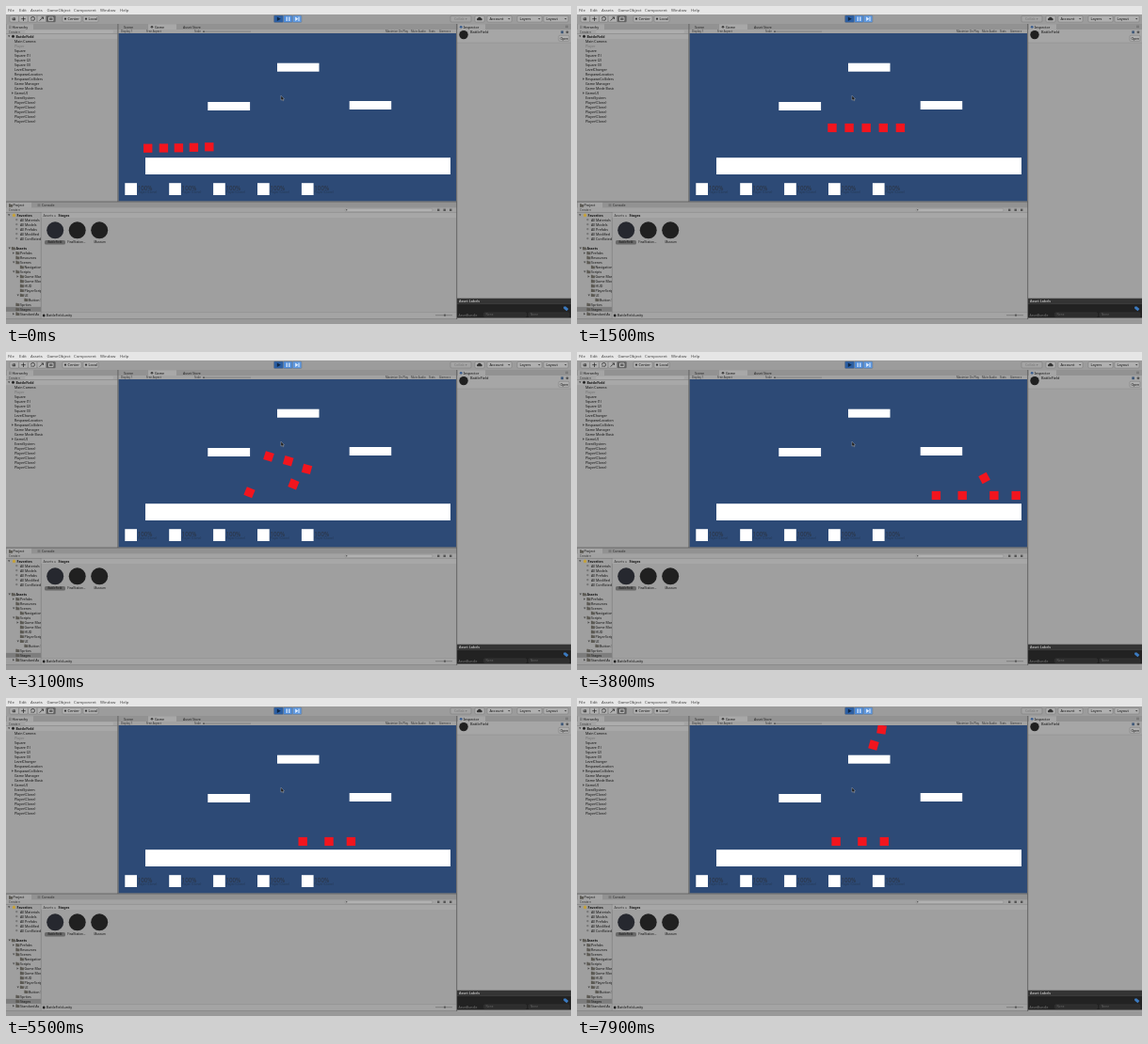
Write an HTML page that moves like this. It is 600 px wide and 338 px high and loops after 8 s.

```html
<!DOCTYPE html>
<html lang="en">
<head>
<meta charset="utf-8">
<title>Editor play mode</title>
<style>
  html, body { margin: 0; width: 100%; height: 100%; overflow: hidden; background: #a0a0a0; }
  svg { display: block; width: 100vw; height: 100vh; }
  text { font-family: "Noto Sans", "Open Sans", sans-serif; white-space: pre; }
</style>
</head>
<body>
<svg id="stage" viewBox="0 0 600 338" preserveAspectRatio="none"></svg>
<script>
const LOOP = 8000, STEP = 100, FLOOR_Y = 152.5;
const stage = document.getElementById('stage');
const parts = [];

const rect = (x, y, w, h, fill, extra = '') =>
  parts.push(`<rect x="${x}" y="${y}" width="${w}" height="${h}" fill="${fill}" ${extra}/>`);
const text = (x, y, str, size = 3.6, fill = '#111', weight = 400) =>
  parts.push(`<text x="${x}" y="${y}" font-size="${size}" fill="${fill}" font-weight="${weight}">${str}</text>`);
const path = (d, fill, extra = '') => parts.push(`<path d="${d}" fill="${fill}" ${extra}/>`);
const line = (d, color = '#222', width = .7) =>
  path(d, 'none', `stroke="${color}" stroke-width="${width}"`);
const disc = (x, y, r, fill) => parts.push(`<circle cx="${x}" cy="${y}" r="${r}" fill="${fill}"/>`);
const button = (x, y, w, h, fill = '#b0b0b0') =>
  rect(x, y, w, h, fill, 'rx="1" stroke="#6c6c6c" stroke-width=".4"');
const arrow = (x, y, open) => path(open
  ? `M${x} ${y - 1}h2.4l-1.2 2z` : `M${x} ${y - 1.2}v2.4l2-1.2z`, '#4c4c4c');
const folder = (x, y) => path(`M${x} ${y - 1.7}h1.5l.5.6h2v2.8h-4z`, '#5c5a54');

function drawMenuAndToolbar() {
  rect(0, 0, 600, 338, '#a0a0a0');
  rect(0, 0, 600, 9, '#e6e6e6');
  [[2, 'File'], [14, 'Edit'], [26, 'Assets'], [43.5, 'GameObject'], [72, 'Component'],
   [100, 'Window'], [121, 'Help']].forEach(([x, s]) => text(x, 6, s, 4.3, '#444'));

  rect(0, 9, 600, 10, '#9c9c9c');
  for (let i = 0; i < 5; i++) button(4 + i * 9.7, 10.3, 9.7, 6.8, i === 4 ? '#606060' : '#b0b0b0');
  line('M7 14.8V12.6M8.3 14.8V12M9.6 14.8V12.4M7 14.8h3');
  line('M18.5 11.5v4.5M16.2 13.7h4.6');
  line('M26.5 13.5a2 2 0 1 1 2 2M26.3 15h2');
  line('M35.5 15.5l4-3.5M37.5 12h2v2');
  line('M45.5 12h4.5v3.6h-4.5z', '#e0e0e0');
  button(60, 10.5, 20, 6.5); disc(63, 13.7, 1.1, '#333'); text(65.5, 15.1, 'Center', 3.9);
  button(82, 10.5, 16, 6.5); disc(85, 13.7, 1.1, '#333'); text(87.5, 15.1, 'Local', 3.9);

  button(284.5, 10, 10, 7.5, '#2c5fa3');
  button(294.5, 10, 9.7, 7.5, '#4f8cd9');
  button(304.2, 10, 9.7, 7.5, '#5f98de');
  path('M287.8 11.5v4.5l4-2.25z', '#0f2747');
  path('M297.6 11.5h1.2v4.5h-1.2zM300.2 11.5h1.2v4.5h-1.2zM307.2 11.5v4.5l3-2.25zM310.5 11.5h1v4.5h-1z', '#e3efff');

  button(472, 10.5, 22, 6.5, '#a4a4a4'); text(476, 15.1, 'Collab ▾', 3.7, '#777');
  button(498, 10.5, 10, 6.5);
  path('M500.5 15.2a1.2 1.2 0 0 1 .5-2.2a2 2 0 0 1 3.7 0a1.2 1.2 0 0 1 .5 2.2z', '#333');
  [[511, 'Account', 26], [543, 'Layers', 26], [571, 'Layout', 26]].forEach(([x, s, w]) => {
    button(x, 10.5, w, 6.5);
    text(x + 2.5, 15.1, s, 3.9);
    path(`M${x + w - 4} 13h2.4l-1.2 1.6z`, '#444');
  });
}

function drawHierarchy() {
  rect(0, 19, 118.5, 189, '#9f9f9f');
  rect(0, 19, 118.5, 6, '#929292');
  rect(1, 19.3, 28, 5.7, '#a5a5a5');
  line('M3 21.2h2.5M3 22.4h2.5M3 23.6h2.5', '#444', .4);
  text(6.5, 23.5, 'Hierarchy', 3.7);
  rect(0, 25, 118.5, 4.5, '#a4a4a4');
  line('M0 29.6H118.5', '#777', .4);
  text(3, 28.6, 'Create ▾', 3.1, '#333');
  rect(20, 25.7, 94, 3.2, '#adadad', 'rx="1.5"');
  rect(0, 30, 118.5, 5, '#a8a8a8');
  arrow(2, 32.3, true);
  disc(7.5, 32.3, 1.5, '#222');
  text(10.5, 33.6, 'BattleField', 3.5, '#111', 700);
  const rows = ['Main Camera', 'Player', 'Square', 'Square (1)', 'Square (2)', 'Square (3)',
    'LevelChanger', 'RespawnLocation', 'RespawnColliders', 'Game Manager', 'Game Mode Basic',
    'GameUI', 'EventSystem', ...Array(5).fill('Player(Clone)')];
  rows.forEach((s, i) => {
    const y = 38.6 + i * 5.02;
    text(9, y, s, 3.6, s === 'Player' ? '#707070' : '#111');
    if (i === 8 || i === 11) arrow(6, y - 1.3, false);
  });
}

function drawGamePanel() {
  rect(119, 19, 359.5, 10, '#929292');
  text(125, 23.5, 'Scene', 3.6, '#222');
  rect(151, 19.3, 30, 5.7, '#a8a8a8');
  disc(155, 22.2, 1.3, '#444');
  text(158, 23.5, 'Game', 3.6);
  text(188, 23.5, 'Asset Store', 3.6, '#222');
  rect(119, 25, 359.5, 4, '#a2a2a2');
  text(122, 28.3, 'Display 1', 2.9, '#333');
  text(149, 28.3, 'Free Aspect', 2.9, '#333');
  text(200, 28.3, 'Scale', 2.9, '#333');
  line('M209 27.2H260', '#666', .5);
  disc(210, 27.2, .9, '#555');
  text(403, 28.3, 'Maximize On Play', 2.9, '#333');
  text(430, 28.3, 'Mute Audio', 2.9, '#333');
  text(449, 28.3, 'Stats', 2.9, '#333');
  text(460, 28.3, 'Gizmos ▾', 2.9, '#333');
  rect(119.5, 29, 358.5, 178.5, '#2d4a76');
  [[288, 60.7, 44.5, 9], [214.3, 102, 44.8, 9], [364.7, 101, 44.5, 9], [148, 161.2, 324, 17.8]]
    .forEach(([x, y, w, h]) => rect(x, y, w, h, '#fff'));
  for (let i = 0; i < 5; i++) {
    const x = 126.3 + i * 46.9;
    rect(x, 188.2, 12.7, 12.8, '#fff');
    text(x + 13.4, 195.8, '100%', 6.2, '#2b3340');
    text(x + 13.4, 199.4, 'Player (Clone)', 3.2, '#263954');
  }
}

function drawProject() {
  rect(0, 208, 478.5, 130, '#9f9f9f');
  rect(0, 208, 478.5, 6.5, '#929292');
  rect(1, 208.7, 26, 6, '#a5a5a5');
  folder(3, 212); text(7.5, 213.2, 'Project', 3.6);
  rect(33.5, 210.3, 3, 2.8, '#777'); text(38, 213.2, 'Console', 3.6, '#222');
  rect(0, 214.5, 478.5, 4.8, '#a3a3a3');
  text(3, 218.2, 'Create ▾', 3.1, '#333');
  rect(360, 215.2, 93, 3.5, '#b1b1b1', 'rx="1.7" stroke="#777" stroke-width=".3"');
  disc(361.7, 216.8, .8, '#555');
  [458, 464.5, 471].forEach(x => rect(x, 215.6, 2.4, 2.4, '#555'));
  line('M0 219.4H478.5M37.3 219.4V333', '#6e6e6e', .5);
  rect(37.5, 219.6, 441, 5.4, '#a7a7a7');
  text(39.5, 223.8, 'Assets', 3.6, '#333');
  text(51.5, 223.8, '▸', 3.5, '#444');
  text(55.5, 223.8, 'Stages', 3.6, '#111', 700);

  arrow(2, 222.2, true);
  path('M8.5 220l.7 1.5 1.6.2-1.2 1.1.3 1.6-1.4-.8-1.4.8.3-1.6-1.2-1.1 1.6-.2z', '#caa22c');
  text(11.5, 223.6, 'Favorites', 3.5, '#111', 700);
  ['All Materials', 'All Models', 'All Prefabs', 'All Modified', 'All Conflicted'].forEach((s, i) => {
    const y = 228.6 + i * 5;
    disc(11.3, y - 1.5, 1.2, '#777');
    text(15, y, s, 3.6);
  });

  const tree = [[0, 'Assets'], [1, 'Prefabs'], [1, 'Resources'], [1, 'Scenes'], [2, 'Navigation'],
    [1, 'Scripts'], [2, 'Game Man'], [2, 'Game Mod'], [2, 'HUD'], [2, 'PlayerScrip'],
    [2, 'UI'], [3, 'Button S'], [1, 'Sprites'], [1, 'Stages'], [1, 'Standard As']];
  parts.push('<g clip-path="url(#treeClip)">');
  tree.forEach(([depth, s], i) => {
    const y = 258.9 + i * 4.98, x = 10.5 + depth * 4.5;
    if (s === 'Stages') rect(0, y - 3.8, 37, 5, '#7d7d7d');
    folder(x - 4.6, y - 1.3);
    if ([0, 1, 3, 5, 6, 10, 14].includes(i)) arrow(x - 8, y - 1.3, [0, 3, 5, 10].includes(i));
    text(x, y, s, 3.6, '#111', depth ? 400 : 700);
  });
  parts.push('</g>');

  [[52.2, '#26282f'], [75.7, '#202020'], [99.2, '#202020']].forEach(([x, c]) => disc(x, 238.3, 9, c));
  rect(41, 249, 22, 4.6, '#696969', 'rx="1.5"');
  text(44.4, 252.3, 'BattleField', 3);
  text(65.3, 252.3, 'FinalStation…', 3);
  text(93.4, 252.3, 'Museum', 3);

  rect(37.5, 325.6, 441, 6.8, '#a4a4a4');
  line('M37.5 325.6H478.5', '#858585', .4);
  disc(40.2, 329, 1.4, '#222');
  text(42.8, 330.2, 'BattleField.unity', 3.6);
  line('M456 328.7H474', '#555', .5);
  disc(466, 328.7, 1.1, '#555');
  rect(0, 332.4, 600, 5.6, '#999');
  line('M0 332.5H478.5', '#777', .5);
}

function drawInspector() {
  rect(479, 19, 121, 314, '#a0a0a0');
  rect(479, 19, 121, 6, '#929292');
  rect(480, 19.3, 29, 5.7, '#a5a5a5');
  disc(483.2, 22.3, 1.4, '#3e5f8f');
  text(485.7, 23.5, 'Inspector', 3.7);
  line('M594 21.2h3M594 22.6h3', '#444', .4);
  rect(479, 25, 121, 14, '#a6a6a6');
  disc(486, 30.6, 4.7, '#202020');
  text(493, 29.2, 'BattleField', 3.9);
  rect(589.3, 26.4, 2.6, 2.8, '#3d5677');
  disc(596, 27.8, 1.4, '#555');
  button(587, 31.3, 11, 6); text(588.4, 35.6, 'Open', 3.4);
  line('M479 39H600', '#858585', .4);
  rect(479, 310.7, 121, 6.2, '#343434');
  text(481, 315, 'Asset Labels', 3.6, '#b5b5b5', 700);
  rect(479, 316.9, 121, 14.6, '#222');
  path('M592 319.8l2.2-.6 3.2 2.8-2 2.2-3.2-2.6z', '#3b7ac0');
  text(480.5, 329.5, 'AssetBundle', 3.4, '#777');
  [[507.5, 45], [555, 43]].forEach(([x, w]) => {
    rect(x, 325.8, w, 4.8, '#2d2d2d', 'rx="1" stroke="#444" stroke-width=".3"');
    text(x + 2, 329.4, 'None', 3.1, '#666');
  });
  line('M478.7 19V333M118.9 19V208', '#555', .8);
  line('M0 208H478.5', '#555', .7);
}

drawMenuAndToolbar();
drawHierarchy();
drawGamePanel();
drawProject();
drawInspector();
stage.innerHTML = `<defs>
  <clipPath id="viewClip"><rect x="119.5" y="29" width="358.5" height="178.5"/></clipPath>
  <clipPath id="treeClip"><rect x="0" y="219" width="37" height="113"/></clipPath></defs>
  ${parts.join('')}
  <g clip-path="url(#viewClip)">${'<rect class="player" x="-4.7" y="-4.6" width="9.4" height="9.2" fill="#f2151e"/>'.repeat(5)}</g>
  <path d="M292 95.2v5l1.2-1 .8 1.7.8-.4-.8-1.6h1.5z" fill="#111" stroke="#ddd" stroke-width=".35"/>`;

// start: first position, air / fall / far: [x, y, angle] at 2400, 3100 and 3800 ms
const players = [
  { start: [150.7, 151.2], air: [219.5, 130.5, -40], fall: [258.5, 149.3, 22], far: [381.4, FLOOR_Y, 0], land: 3200 },
  { start: [167.4, 151], air: [231, 91, -20], fall: [279, 111, 18], far: [409.2, FLOOR_Y, 0], land: 3600 },
  { start: [183.4, 150.8], air: [254, 91.3, -8], fall: [299.7, 115.8, 16], far: [432.6, 134, -28], land: 0 },
  { start: [199.4, 150.3], air: [271.2, 108.5, -8], fall: [305.4, 140.4, 22], far: [442.9, FLOOR_Y, 0], land: 3300 },
  { start: [215.8, 149.8], air: [288.6, 99.3, -12], fall: [319.5, 124.4, 15], far: [466.2, FLOOR_Y, 0], land: 3500 }
];

// Piecewise linear track of [time, ...values]
function track(keys, t) {
  let i = 1;
  while (i < keys.length - 1 && keys[i][0] <= t) i++;
  const [a, b] = [keys[i - 1], keys[i]];
  const k = Math.min(1, Math.max(0, (t - a[0]) / (b[0] - a[0])));
  return a.slice(1).map((v, n) => v + (b[n + 1] - v) * k);
}

const walk = [[3800, 0], [4100, 36], [4300, 36], [4700, -15.5], [5100, -15.5],
  [5500, -66.2], [5900, -66.2], [6200, -106.3]];

function leap(p, i, t) {
  const home = 271 + 18.1 * i;
  const { air, fall, far, land } = p;
  const keys = [[0, ...p.start, 0], [700, home, FLOOR_Y, 0], [1100, home, FLOOR_Y, 0],
    [1500, home, 129.5, 0], [1800, home - 2, i ? 115 : 118, 0],
    [2000, home - 23, i ? 106.5 : 119, i ? 0 : -15], [2400, ...air],
    [2600, air[0] - 6, air[1] + (fall[1] - air[1]) * .1, air[2] + 10], [3100, ...fall]];
  if (land) {
    const k = (land - 3100) / 700;
    keys.push([land, fall[0] + (far[0] - fall[0]) * k, FLOOR_Y, 0]);
  }
  keys.push([3800, ...far]);
  return track(keys, t);
}

function respawn(i, t) {
  const s = (t - 7100) / 100, drop = .41 * s * s;
  return i === 3 ? [318 - s * .38, 23.8 + drop, s * 2] : [321 + s * .32, 14 + drop * .745, s * 1.2];
}

function pose(i, t) {
  const p = players[i];
  if (t <= 3800) return leap(p, i, t);
  const [x, y, angle] = p.far;
  if (i < 3) {
    const settle = Math.max(0, 1 - (t - 3800) / 300);
    const dx = track(walk, t)[0];
    return [x + dx, FLOOR_Y - (FLOOR_Y - y) * settle, angle * settle];
  }
  if (t >= 7200) return respawn(i, t);
  if (t >= 4800) return null;
  const off = i === 3 ? 4150 : 3950;
  const s = Math.max(0, (t - off) / 100);
  return [x + track([[3800, 0], [4100, 36]], t)[0], y + .65 * s * s, s * 4];
}

const nodes = [...document.querySelectorAll('.player')];
function render(t) {
  nodes.forEach((node, i) => {
    const p = pose(i, t);
    node.setAttribute('visibility', p ? 'visible' : 'hidden');
    if (p) node.setAttribute('transform', `translate(${p[0]} ${p[1]}) rotate(${p[2]})`);
  });
}

const began = performance.now();
function tick() {
  const t = (performance.now() - began) % LOOP;
  render(Math.floor(t / STEP) * STEP);
  requestAnimationFrame(tick);
}
render(0);
requestAnimationFrame(tick);
</script>
</body>
</html>
```
